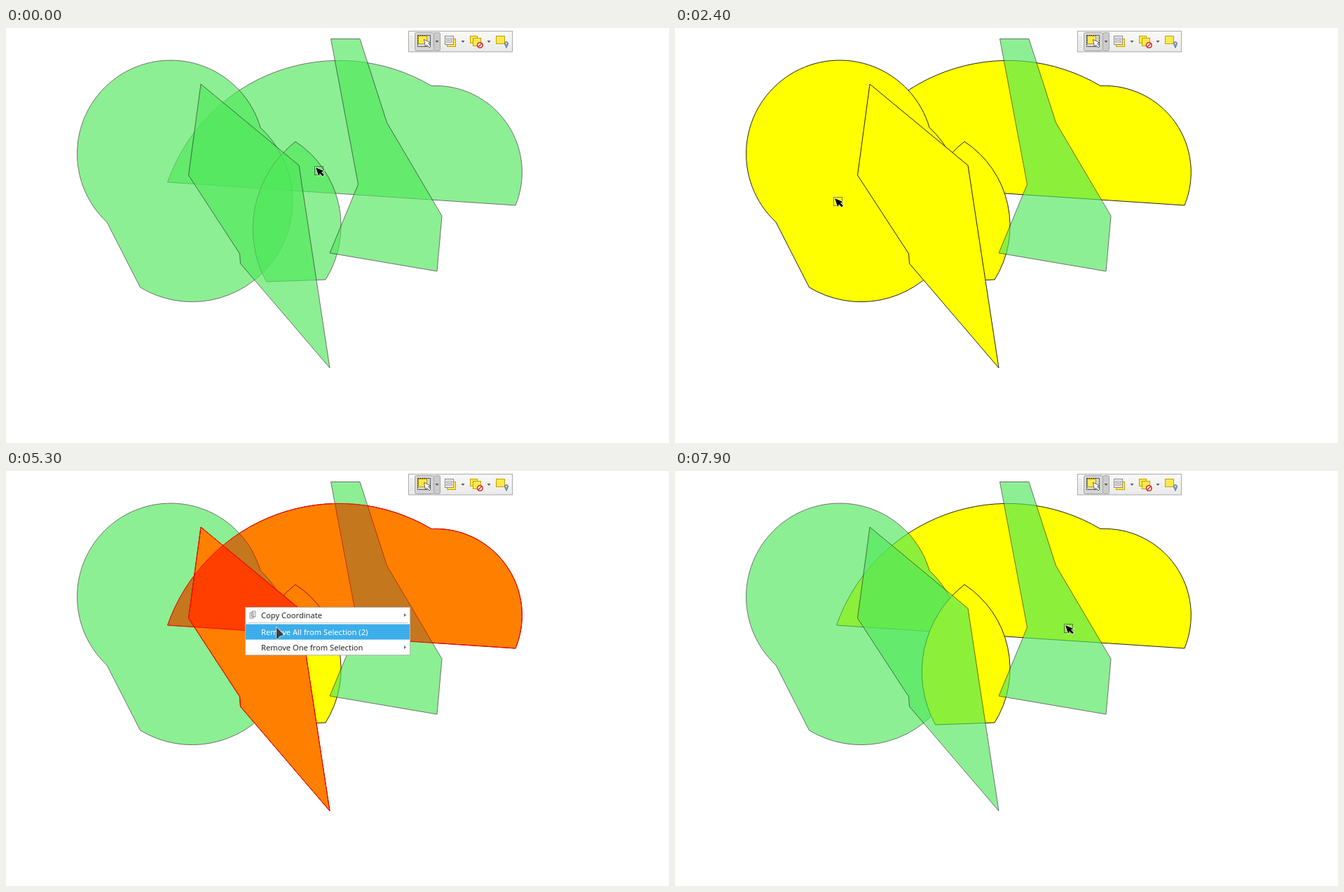
These frames come from a looping animation (946x592 px, 8000 ms). An HTML page:

```html
<!DOCTYPE html>
<html lang="en">
<head>
<meta charset="utf-8">
<title>Feature selection menu</title>
<style>
  html, body { margin: 0; width: 100%; height: 100%; overflow: hidden; background: #fff; }
  svg { display: block; }
  text { font: 11.15px "Noto Sans", "Open Sans", sans-serif; fill: #232629; }
  .on text { fill: #fff; }
  .off text { fill: #aeb0b1; }
  .feature { fill: #50e85a; stroke: #232323; opacity: .65; }
  .feature.selected { fill: #ff0; opacity: 1; }
  .glow { fill: rgba(255, 0, 0, .5); stroke: #f00; }
  .tile { fill: #fce94f; stroke: #c4a000; }
</style>
</head>
<body>
<svg id="stage" width="946" height="592" viewBox="0 0 946 592">
  <defs>
    <linearGradient id="bar" x2="0" y2="1">
      <stop stop-color="#fafafa"/><stop offset="1" stop-color="#e9e9e9"/>
    </linearGradient>
  </defs>
  <g id="features"></g>
  <g id="glows"></g>
  <g id="toolbar">
    <rect x="574.5" y="4.5" width="148" height="29.5" fill="url(#bar)" stroke="#a9a9a9"/>
    <path d="M577.5 11V28M579.5 12V28" stroke="#c9c7b4" stroke-dasharray="1 2"/>
    <rect x="583.5" y="6.5" width="27" height="26" rx="2" fill="#d5d5d5" stroke="#a6a6a6"/>
    <rect x="610.5" y="6.5" width="9" height="26" rx="2" fill="#cbcbcb" stroke="#a6a6a6"/>
    <rect class="tile" x="588.5" y="11.5" width="12" height="11"/>
    <rect x="587.5" y="10.5" width="18" height="16" fill="none" stroke="#222" stroke-dasharray="2 1"/>
    <path d="M596.5 16.5L606 21L602.5 22L606 26L604 28L600.5 24L598.5 27Z" fill="#fff" stroke="#444" stroke-width=".8"/>
    <rect class="tile" x="629.5" y="15.5" width="12" height="11"/>
    <rect x="626.5" y="11.5" width="12" height="12" fill="#f2f2f2" stroke="#888"/>
    <path d="M628.5 14.5H636.5V16.5H628.5ZM628.5 18.5H636.5V20.5H628.5Z" fill="#fff" stroke="#888" stroke-width=".8"/>
    <rect class="tile" x="662.5" y="11.5" width="10" height="10"/>
    <rect class="tile" x="666.5" y="14.5" width="11" height="11"/>
    <circle cx="676.3" cy="24.5" r="3.8" fill="#fff" stroke="#d92b2b" stroke-width="1.6"/>
    <path d="M673.8 27L678.8 22" stroke="#d92b2b" stroke-width="1.5"/>
    <rect class="tile" x="699.5" y="11.5" width="12" height="11"/>
    <path d="M714 28.5L711.8 23.5A2.6 2.6 0 1 1 716.2 23.5Z" fill="#7d9cb8" stroke="#55748f" stroke-width=".8"/>
    <circle cx="714" cy="22" r=".9" fill="#fff"/>
    <path d="M612.5 18h5l-2.5 3zM649.5 18h5l-2.5 3zM686.5 18h5l-2.5 3z" fill="#555"/>
  </g>
  <g id="menus"></g>
  <g id="mapCursor">
    <rect x="-1.5" y="-1.5" width="12" height="12" fill="none" stroke="#111" stroke-dasharray="1 1"/>
    <path d="M0 0L11.5 5L8 6.5L11.8 10.5L9.8 12.5L6 8.5L4 12Z" stroke="#fff" stroke-width="1.4" paint-order="stroke"/>
  </g>
  <path id="arrowCursor" d="M0 0L9.5 9.5L9 11.5L5 12.5L1.5 16.5L0 15.5Z" fill="#3b4045" stroke="#fff" stroke-width="1.2" paint-order="stroke"/>
</svg>
<script>
const LOOP = 8000, STEP = 100, ROW = 22;
const $ = id => document.getElementById(id);

// Listed from the bottom layer to the top one
const outlines = {
  dome: "M230.5 220A259 259 0 0 1 607 82.5A123.5 123.5 0 0 1 727 253Z",
  blob: "M144 277A133.4 133.4 0 1 1 363 142A143.4 143.4 0 0 1 191.5 370Z",
  lens: "M413 162A144 144 0 0 1 456 359L371.5 362A158 158 0 0 1 413 162Z",
  kite: "M278 80L418 196L462 485L334.5 336L333.5 322L260.5 210Z",
  boot: "M463.5 15.5H505L543.5 135L622 268L615 347L462 321L502.5 223Z"
};

// Shapes selected from each time on
const selections = [
  [0, ""], [1800, "dome blob lens kite"], [4200, "dome lens kite"], [7400, "dome lens"]
];

// Shapes lit by the hovered menu entry
const lit = [
  [0, ""], [1300, "dome blob lens kite"], [1800, ""], [3200, "blob"], [4200, ""],
  [5200, "dome kite"], [6700, "kite"], [7400, ""]
];

// Pointer tip: time, x, y
const pointer = [
  [0, 442, 199], [100, 444, 200], [300, 436, 216], [400, 422, 222], [500, 407, 216],
  [600, 398, 209], [800, 398, 209], [1000, 404, 214], [1100, 404, 214], [1300, 428, 235],
  [1500, 438, 239], [1700, 438, 239], [1900, 405, 240], [2200, 262, 242], [2400, 228, 243],
  [2500, 228, 243], [2900, 252, 258], [3000, 252, 258], [3200, 277, 269], [3400, 291, 271],
  [4100, 291, 271], [4700, 342, 194], [4800, 342, 195], [5300, 386, 223], [5500, 392, 229],
  [5900, 404, 250], [6000, 409, 252], [6500, 556, 257], [6700, 596, 267], [6900, 612, 270],
  [7300, 612, 270], [7800, 560, 223], [7900, 557, 220]
];

const menuSpecs = [
  { x: 398.5, y: 210.5, w: 177, from: 800, to: 1800, rows: [
    { text: "Copy Coordinate", more: true, icon: true },
    { text: "Select All (4)", hot: [1300, 1800] },
    { text: "Select One", more: true }] },
  { x: 227.5, y: 244.5, w: 235, from: 2600, to: 4200, rows: [
    { text: "Copy Coordinate", more: true, icon: true },
    { text: "Remove from Selection", hot: [3200, 4200] },
    { text: "Remove One from Selection", more: true, off: true }] },
  { x: 341.5, y: 194.5, w: 235, from: 4800, to: 7400, rows: [
    { text: "Copy Coordinate", more: true, icon: true },
    { text: "Remove All from Selection (2)", hot: [5200, 5800] },
    { text: "Remove One from Selection", more: true, hot: [5800, 7400] }] },
  { x: 577.5, y: 241.5, w: 100, from: 6000, to: 7400, rows: [
    { text: "Feature 1" },
    { text: "Feature 4", hot: [6700, 7400] }] }
];

function add(parent, tag, attrs = {}) {
  const el = document.createElementNS("http://www.w3.org/2000/svg", tag);
  for (const key in attrs) el.setAttribute(key, attrs[key]);
  return parent.appendChild(el);
}

const show = (el, visible) => el.style.display = visible ? "" : "none";
const within = (t, [from, to]) => t >= from && t < to;
const latest = (table, t) => table.filter(row => row[0] <= t).pop()[1].split(" ");

const shapes = Object.entries(outlines).map(([name, d]) => ({
  name,
  body: add($("features"), "path", { d, class: "feature" }),
  glow: add($("glows"), "path", { d, class: "glow" })
}));

function buildMenu({ x, y, w, from, to, rows }) {
  const box = add($("menus"), "g", { transform: `translate(${x} ${y})` });
  const split = rows[0].icon;
  const height = rows.length * ROW + (split ? 2 : 0);
  add(box, "rect", { width: w, height, fill: "#fff", stroke: "#b4b6b8" });
  if (split) add(box, "path", { d: `M3 22H${w - 3}`, stroke: "#c6c8c9" });

  const items = rows.map((row, i) => {
    const top = i * ROW + (split && i ? 2 : 0);
    const g = add(box, "g", { transform: `translate(0 ${top})`, class: row.off ? "off" : "" });
    const bar = add(g, "rect", { x: .5, width: w - 1, height: ROW, fill: "#3daee9" });
    add(g, "text", { x: 22.5, y: 15 }).textContent = row.text;
    if (row.more) add(g, "path", {
      d: `M${w - 8.5} 8.5L${w - 5.5} 11L${w - 8.5} 13.5Z`, fill: row.off ? "#b8babb" : "#65696c"
    });
    if (row.icon) add(g, "path", {
      d: "M9.5 5.5H14.5V13.5H9.5ZM6.5 7.5H11.5V15.5H6.5ZM8 10H10M8 12H10",
      fill: "#f6f6f6", stroke: "#85898c", "stroke-width": .9
    });
    return { g, bar, hot: row.hot || [0, 0], off: row.off };
  });
  return { box, items, span: [from, to] };
}

const menus = menuSpecs.map(buildMenu);

function pointerAt(t) {
  const i = pointer.findIndex(p => p[0] > t);
  if (i < 0) return pointer[pointer.length - 1].slice(1);
  const [t0, x0, y0] = pointer[i - 1], [t1, x1, y1] = pointer[i];
  const k = (t - t0) / (t1 - t0);
  return [x0 + (x1 - x0) * k, y0 + (y1 - y0) * k].map(Math.round);
}

function draw(t) {
  const selected = latest(selections, t), glowing = latest(lit, t);
  for (const { name, body, glow } of shapes) {
    body.classList.toggle("selected", selected.includes(name));
    show(glow, glowing.includes(name));
  }
  for (const { box, items, span } of menus) {
    show(box, within(t, span));
    for (const { g, bar, hot } of items) {
      const on = within(t, hot);
      show(bar, on);
      g.classList.toggle("on", on);
    }
  }
  const inMenu = menus.some(m => within(t, m.span));
  const place = `translate(${pointerAt(t).join(" ")})`;
  for (const id of ["mapCursor", "arrowCursor"]) {
    $(id).setAttribute("transform", place);
    show($(id), (id === "arrowCursor") === inMenu);
  }
}

const start = performance.now();
function tick() {
  const t = (performance.now() - start) % LOOP;
  draw(Math.floor(t / STEP) * STEP);
  requestAnimationFrame(tick);
}
tick();
</script>
</body>
</html>
```
